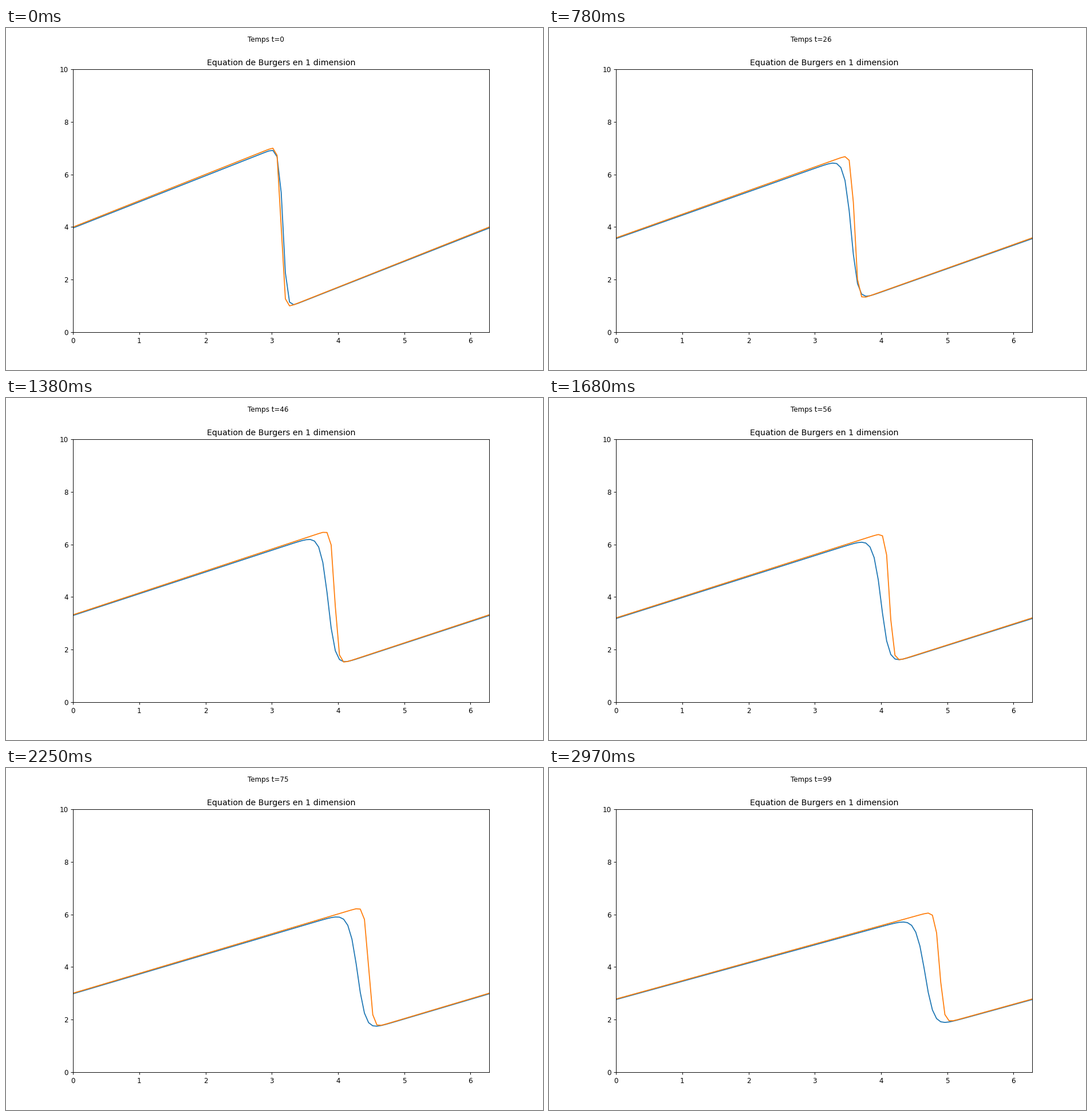
Recreate the animation shown at these times as a matplotlib script. Size 938 by 597 pixels, loop 3000 ms.

```python
import numpy as np
import matplotlib.pyplot as plt
from matplotlib.animation import FuncAnimation

W, H, DPI = 938, 597, 85.3  # about 11 by 7 inches
FRAMES, INTERVAL = 100, 30

NX = 101
NU = 0.07
DX = 2 * np.pi / (NX - 1)
DT = DX * NU
LEAD = 2  # solver steps already taken when the first picture is shown

x = np.linspace(0, 2 * np.pi, NX)


def exact(t):
    """Cole-Hopf saw-tooth solution of the viscous Burgers equation."""
    a = x - 4 * t
    b = a - 2 * np.pi
    s = 4 * NU * (t + 1)
    ea, eb = np.exp(-a**2 / s), np.exp(-b**2 / s)
    return 4 + (a * ea + b * eb) / ((t + 1) * (ea + eb))


def step(u):
    """Upwind convection, centred diffusion, periodic ends."""
    v = u[:-1]
    left, right = np.roll(v, 1), np.roll(v, -1)
    new = (v - v * DT / DX * (v - left)
           + NU * DT / DX**2 * (right - 2 * v + left))
    return np.append(new, new[0])


computed = [exact(0)]
for _ in range(FRAMES + LEAD):
    computed.append(step(computed[-1]))

# the tiny margin keeps the pixel size from being truncated
fig, ax = plt.subplots(figsize=(W / DPI + 1e-9, H / DPI + 1e-9), dpi=DPI)
ax.set_xlim(0, 2 * np.pi)
ax.set_ylim(0, 10)
ax.set_title("Equation de Burgers en 1 dimension")
numeric, = ax.plot([], [], color="tab:blue")
analytic, = ax.plot([], [], color="tab:orange")
clock = fig.text(0.45, 0.96, "")


def update(n):
    numeric.set_data(x, computed[n + LEAD])
    analytic.set_data(x, exact(n * DT))
    clock.set_text(f"Temps t={n}")
    return numeric, analytic, clock


anim = FuncAnimation(fig, update, frames=FRAMES, interval=INTERVAL,
                     repeat=True, repeat_delay=0)
plt.show()
```
